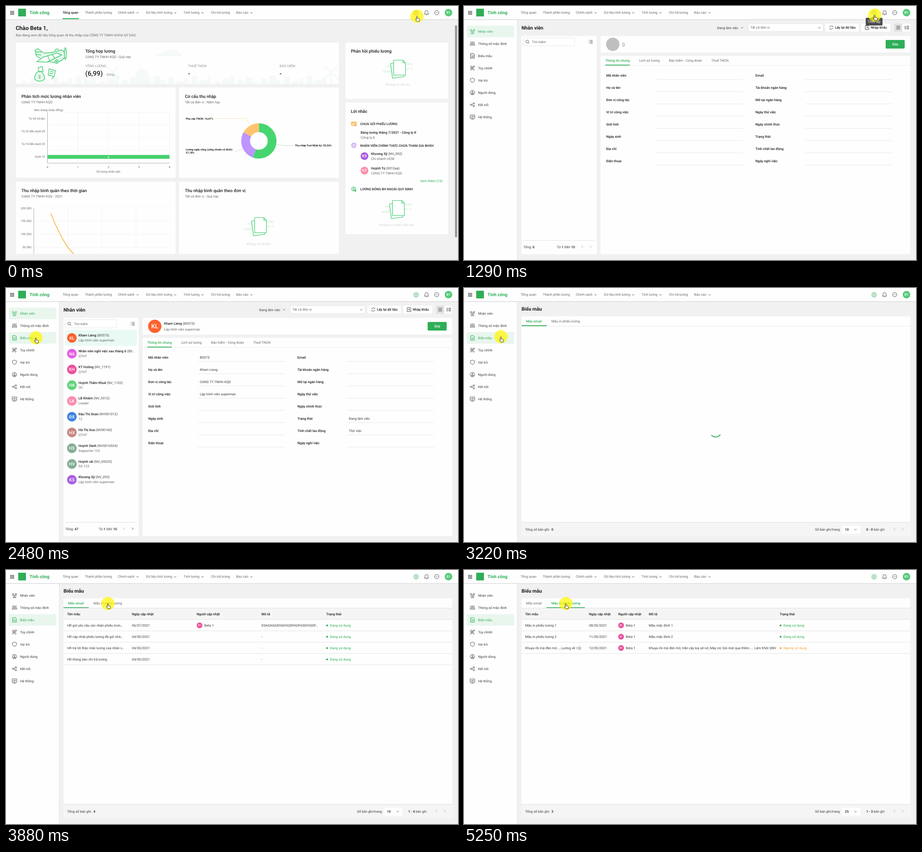
These frames come from a looping animation (998x561 px, 5550 ms). An HTML page:

```html
<!DOCTYPE html>
<html lang="vi">
<head>
<meta charset="utf-8">
<title>Tính công</title>
<style>
html,body{margin:0;width:100%;height:100%;overflow:hidden;background:#f1f1f2}
svg{display:block;width:100vw;height:100vh}
text{font:400 7.45px Roboto,sans-serif;fill:#3c3c3c;text-rendering:geometricPrecision}
.b{font-weight:500;font-size:7.45px;fill:#1f1f1f}
.r{font-weight:400;fill:#444}
.m{fill:#686868}
.l{fill:#929292}
.h{font-weight:500;font-size:9.5px;fill:#1f1f1f}
.t{font-weight:600;font-size:10.7px;fill:#1d1d1d}
.s{font-size:6.45px;fill:#666}
.x{font-weight:700;font-size:5.85px;fill:#222}
.pale{fill:#d4d4d4}
.g{fill:#2fae58}
.o{fill:#f3a13a}
.w{fill:#fff}
.i{font-style:italic}
.c{text-anchor:middle}
.e{text-anchor:end}
.tip{animation:tip 5550ms linear infinite}
.spin{transform-origin:555.5px 316px;animation:spin 1110ms linear -930ms infinite}
.cursor{animation:move 5550ms linear infinite}
@keyframes spin{to{transform:rotate(360deg)}}
@keyframes tip{0%,2.7%{opacity:0}8%,35.9%{opacity:1}41.2%,100%{opacity:0}}
</style>
</head>
<body>
<script>
const LOOP = 5550, GREEN = '#2fae58', MINT = '#3ecb70';
const rules = [];
const pc = ms => (ms / LOOP * 100).toFixed(4) + '%';

const T = (x, y, s, cls = '', extra = '') =>
  `<text x="${x}" y="${y}" dy=".355em" class="${cls}" ${extra}>${s}</text>`;
const R = s => `<tspan class="r">${s}</tspan>`;
const box = (x, y, x2, y2, fill = '#fefefe', extra = '') =>
  `<rect x="${x}" y="${y}" width="${x2 - x}" height="${y2 - y}" fill="${fill}" ${extra}/>`;
const card = (x, y, x2, y2) => box(x, y, x2, y2, '#fefefe', 'rx="2"');
const field = (x, y, x2, y2) => box(x, y, x2, y2, '#fff', 'rx="1.5" stroke="#dcdcdc" stroke-width=".7"');
const line = (d, stroke = '#444', w = .9, extra = '') =>
  `<path d="${d}" fill="none" stroke="${stroke}" stroke-width="${w}" ${extra}/>`;
const dot = (x, y, r, fill, extra = '') => `<circle cx="${x}" cy="${y}" r="${r}" fill="${fill}" ${extra}/>`;
const ring = (x, y, r, stroke = '#444', w = .9) => dot(x, y, r, 'none', `stroke="${stroke}" stroke-width="${w}"`);
const at = (x, y, s) => `<g transform="translate(${x} ${y})">${s}</g>`;
const avatar = (x, y, r, fill, s, size) =>
  dot(x, y, r, fill) + T(x, y, s, 'w c', `style="font-size:${size}px;font-weight:500"`);
const down = (x, y) => line(`M${x - 2.3} ${y - 1.1}l2.3 2.3 2.3-2.3`, '#555', 1);
const arrow = (x, y, dir, stroke) => line(`M${x - dir} ${y - 2.4}l${dir * 2.3} 2.4 ${-dir * 2.3} 2.4`, stroke);
const each = (list, fn) => list.map(fn).join('');

// Shows its content only between two moments of the loop.
function during(from, to, content) {
  const name = 'on' + rules.length;
  rules.push(`@keyframes ${name}{0%{visibility:hidden}${pc(from)}{visibility:visible}${pc(to)}{visibility:hidden}}`);
  return `<g style="animation:${name} ${LOOP}ms step-end infinite">${content}</g>`;
}

const sheets = (x, y) => at(x, y,
  box(-17, 11, -6, 16, '#eaf7ef', 'rx="2.5"') + box(-24, 22.5, -5, 27.5, '#eaf7ef', 'rx="2.5"') +
  box(27, 6.5, 42, 11.5, '#eaf7ef', 'rx="2.5"') + dot(39, 19, 2.5, '#eaf7ef') + box(24, 17, 34, 21.5, '#eaf7ef') +
  `<g fill="#f3fbf6" stroke="${MINT}" stroke-width="1.2"><path d="M0 6l-7 2 4.5 32 25.5-3.5v-4z"/>
   <path fill="#fff" d="M0 0h20.5l5.5 6v27h-26zM20.5 0v6h5.5"/></g>`);

const gear = stroke => at(905.5, 15,
  line('M-1.3-5h2.6l.5 1.6 1.7-.5 1.5 2.2-1.1 1.7 1.1 1.7-1.5 2.2-1.7-.5-.5 1.6h-2.6l-.5-1.6-1.7.5-1.5-2.2 1.1-1.7-1.1-1.7 1.5-2.2 1.7.5z', stroke, 1) +
  ring(0, 0, 1.7, stroke, 1));

function header() {
  const nav = [[174, 'Thành phần lương'], [247, 'Chính sách', 290.5], [309, 'Dữ liệu tính lương', 373.5],
    [392, 'Tính lương', 434], [452.5, 'Chi trả lương'], [508, 'Báo cáo', 542]];
  let s = box(0, 28.5, 998, 31, '#e2e3e4') + box(0, 0, 998, 29, '#fefefe');
  for (let k = 0; k < 9; k++) s += box(9.5 + k % 3 * 3.1, 11 + (k / 3 | 0) * 3.1, 11.6 + k % 3 * 3.1, 13.1 + (k / 3 | 0) * 3.1, '#333', 'rx=".4"');
  return s + box(27, 6, 44, 23, GREEN) +
    T(52, 14.7, 'Tính công', 'g', 'style="font-size:9.8px;font-weight:600"') +
    during(0, 1290, T(125, 14.7, 'Tổng quan', 'b') + box(125, 27, 161, 29, GREEN) + gear('#666')) +
    during(1290, LOOP, T(125, 14.7, 'Tổng quan', 'm') + gear(GREEN)) +
    each(nav, ([x, label, chev]) => T(x, 14.7, label, 'm') + (chev ? down(chev, 15) : '')) +
    line('M923.8 18h9.4l-1.3-2v-3q-.4-3-3.4-3.2q-3 .2-3.4 3.2v3zM927.3 19.7h2.4') +
    ring(951, 14.7, 4.7) + each([949, 951, 953], x => dot(x, 14.7, .6, '#444')) +
    avatar(977, 14.7, 8.3, '#53ca78', 'B1', 7.5);
}

function dashboard() {
  let city = '';
  for (let k = 0; k < 40; k++) {
    const h = 6 + k * 7 % 5 * 3;
    city += box(36 + k * 17, 172 - h, 36 + k * 17 + 8 + k % 3 * 4, 172, '#f5faf7');
  }
  city += '<path d="M283 172q2-33 17-34q16 2 20 34zM330 111q6-9 18-7q5-11 18-6q10-3 14 5q10-1 8 8z" fill="#f5faf7"/>' +
    each([235, 718], x => line(`M${x} 172v-25l-13-14m13 14l14-15m-14 15l16 14m-16-14l-15 14`, '#f3f9f5', 3));

  const art = `<g fill="#e4f8eb" stroke="${MINT}" stroke-width="1.4" stroke-linejoin="round">
    <path d="M67 110l-3-12 6-4 14 10q22-1 38-7q9 4 9 12q-3 11-18 15q-24 3-46-14z"/>
    <path fill="#fff" d="M82 113l30-9 11 4-32 16-23-1z"/><path d="M92 110l5 11m5-14l6 9"/>
    <path d="M64 101l15 1m-14 5l13 1m29-9q4-6 10-3"/>
    <ellipse cx="131" cy="105" rx="2.2" ry="13"/><circle cx="112" cy="123" r="4"/><circle cx="112" cy="123" r="1.2"/>
    <path fill="#fff" d="M71 136l9-2 2 10-9 1z"/>
    <path d="M70 145h8q8 7 7 15q-2 6-11 6t-11-6q0-8 7-15z"/>
    <path fill="#fff" d="M95 139l14 4-3 13-13-4zM97 144l8 2m-9 2l7 2m2 7l-4 4"/></g>` +
    T(74, 157, '$', 'g c', 'style="font-size:9px"');

  const bars = line('M91.5 235h270M91.5 263h270M91.5 291h270M91.5 319h270M159 235v112M226 235v112M293.5 235v112M361 235v112', '#f0f0f0', .7) +
    line('M91.5 235v112h269.5', '#999', .8) + box(91.5, 329, 361, 337.5, '#46d16e') + T(226, 333.5, '4', 'x w c') +
    T(62, 230, 'Mức lương (triệu đồng)', 's i') +
    each(['Từ 30 trở lên', 'Từ 20 đến dưới 30', 'Từ 10 đến dưới 20', 'Dưới 10'], (s, k) => T(86, 248.5 + 28.1 * k, s, 's e')) +
    each([0, 1, 2, 3, 4], k => T(91.5 + 67.4 * k, 355.5, k, 's c')) + T(226, 366, 'Số lượng nhân viên', 's i c');

  const slice = (start, share, stroke) =>
    `<circle cx="558.3" cy="298" r="29.25" fill="none" stroke="${stroke}" stroke-width="19.5" pathLength="100"
     stroke-dasharray="${share} 100" transform="rotate(${start - 90} 558.3 298)"/>`;
  const donut = slice(0, 55.56, '#46d66f') + slice(200, 27.78, '#be95ff') + slice(300, 16.67, '#fec46f') +
    line('M462 248.5h68l9 15', '#fbdba8', .8) + line('M504 321h4l14-5', '#d9c2fb', .8) + line('M597 306l20 2.5h17', '#a3e6b7', .8) +
    T(397, 248.5, 'Phụ cấp TNCN: 16,67%', 'x') + T(638, 308, 'Thu nhập Test Nhật ký: 55,56%', 'x') +
    T(397, 317.3, 'Lương ngày công (công chuẩn cố định):', 'x') + T(397, 323.6, '27,78%', 'x');

  const curve = line('M137 446v101M211.5 446v101M287 446v101M61.5 446h300M61.5 475h300M61.5 504h300M61.5 532.5h300', '#f0f0f0', .7) +
    line('M61.5 446v101.5', '#999', .8) + line('M99 458C110 486 129 529 149.5 547.5', '#f9a11b', 1.3) +
    each(['200.000', '150.000', '100.000', '50.000'], (s, k) => T(56, 446.5 + 28.7 * k, s, 's e'));

  const notes =
    each([[260, '#fff1dc', 'CHƯA GỬI PHIẾU LƯƠNG'], [308, '#f1e8fc', 'NHÂN VIÊN CHÍNH THỨC CHƯA THAM GIA BHXH'],
      [404.5, '#e2f7e9', 'LƯƠNG ĐÓNG BH NGOÀI QUY ĐỊNH']],
      ([y, fill, s]) => dot(768, y, 7, fill) + T(782, y, s, 'b', 'style="font-size:7.25px"')) +
    line('M763 256.5h10v7h-10zl5 4 5-4', '#f5a02c', 1.1) + dot(771.5, 263.5, 2, '#f5a02c') +
    line('M768 303l4 1.5v3.5q-.5 3.5-4 5q-3.5-1.5-4-5v-3.5zM768 305.5v3m0 1v1', '#9d62e0') +
    ring(767.5, 404, 4.2, GREEN) + T(767.5, 404, '$', 'g c') + dot(771.5, 408, 1.7, GREEN) +
    T(783, 279.5, 'Bảng lương tháng 7/2021 - Công ty K', 'b') + T(783, 290.5, 'Công ty K', 'm') +
    avatar(791.5, 331.5, 8.6, '#a95fe0', 'KS', 8.4) + T(806, 326.3, 'Khương Sỹ' + R(' (NV_092)'), 'b') + T(806, 337.3, 'Chi nhánh HCM', 'm') +
    avatar(791.5, 363.5, 8.6, '#fa8eac', 'HT', 8.4) + T(806, 358.3, 'Huỳnh Tú' + R(' (0013aa)'), 'b') + T(806, 369.3, 'CôNG TY TNHH KQD', 'm') +
    T(964, 386.5, 'Xem thêm (16)', 'g e');

  return T(21.5, 49, 'Chào Beta 1,', 't', 'style="font-size:12.4px"') +
    T(21.5, 64.5, 'Bạn đang xem dữ liệu tổng quan về thu nhập của CÔNG TY TNHH KHOA QY DAO.', 'm') +
    card(22, 81, 735, 172) + card(22, 180, 374.5, 379.5) + card(382, 180, 735, 379.5) + card(22, 388, 374.5, 547.5) +
    card(382, 388, 735, 547.5) + card(749.5, 81, 976, 205) + card(749.5, 213, 976, 504) +
    box(991.5, 42.5, 995.8, 511, '#929292', 'rx="2"') + city + art +
    T(175, 100, 'Tổng hợp lương', 'h') + T(175, 112.5, 'CôNG TY TNHH KQD - Quý này', 'm') +
    T(175, 132, 'TỔNG LƯƠNG', 'l') + T(402, 132, 'THUẾ TNCN', 'l') + T(604, 132, 'BẢO HIỂM', 'l') +
    T(175, 148.5, '(6,99)', '', 'style="font-size:14.7px;font-weight:500;fill:#222"') + T(222, 151, 'Đồng', 'l') +
    each([402, 604], x => T(x, 149, '-', 'b', 'style="font-size:14px"')) +
    each([[34, 199.5, 'Phân tích mức lương nhân viên', 'CôNG TY TNHH KQD'], [395, 199.5, 'Cơ cấu thu nhập', 'Tất cả đơn vị - Năm nay'],
      [34, 407.5, 'Thu nhập bình quân theo thời gian', 'CôNG TY TNHH KQD - 2021'],
      [395, 407.5, 'Thu nhập bình quân theo đơn vị', 'Tất cả đơn vị - Quý này']],
      ([x, y, a, b]) => T(x, y, a, 'h') + T(x, y + 12.5, b, 'm')) +
    T(761.5, 100, 'Phản hồi phiếu lương', 'h') + T(761.5, 232.5, 'Lời nhắc', 'h') +
    bars + donut + curve + notes +
    sheets(549, 467.5) + T(558, 525, 'Không có dữ liệu', 'pale i c') +
    sheets(856, 119.5) + T(865.5, 173.5, 'Không có dữ liệu', 'pale i c') +
    sheets(853.5, 429.5) + T(863, 483.5, 'Không có nhân viên nào', 'pale i c');
}

const icons = [
  c => ring(0, 0, 1.6, c) + ring(-3.3, -3, 1.5, c) + ring(3.3, -3, 1.5, c) + line('M-3 5v-1q3-3 6 0v1zM-5 1.5l2.5-1.5m7.5 1.5l-2.5-1.5', c),
  c => line('M-3.5-5v5m0 4v1M0-5v1m0 4v5M3.5-5v5m0 4v1', c) + ring(-3.5, 2, 1.6, c) + ring(0, -2, 1.6, c) + ring(3.5, 2, 1.6, c),
  c => line('M-4-5h6l2 2v8h-8zM-2-.5h4M-2 2.2h4', c, 1.1),
  c => line('M-4.5-3.5l2-1.5 6.5 8.5-1.5 1.5zM4.5-4l-8 8.5-1.5-1 8-8.5zM-5-1l2 1m6-5l2 3', c),
  c => line('M0-5l4.5 1.8v3.2q-.5 3.5-4.5 5q-4-1.5-4.5-5v-3.2z', c),
  c => ring(0, 0, 4.9, c) + ring(0, -1.6, 1.4, c) + line('M-2.5 3v-1.2q2.5-1.6 5 0v1.2z', c),
  c => ring(-3.2, 0, 1.6, c) + ring(3.2, -3, 1.6, c) + ring(3.2, 3, 1.6, c) + line('M-1.7-.7l3.4-1.6m-3.4 3l3.4 1.6', c),
  c => line('M-5-4.5h10v7.5h-10zM-2.5 5h5M-3.5-.7h2l1 1.7 1.3-3.5 1 1.8h1.7', c)
];
const menu = ['Nhân viên', 'Thông số mặc định', 'Biểu mẫu', 'Tùy chỉnh', 'Vai trò', 'Người dùng', 'Kết nối', 'Hệ thống'];
const entry = (k, on) => {
  const y = 56.2 + 27 * k;
  return (on ? box(6, y - 12.7, 111, y + 12.7, '#e9f6ee', 'rx="3"') : '') +
    at(18.7, y, icons[k](on ? GREEN : '#444')) + T(31, y, menu[k], on ? 'g' : '');
};
const sidebar = () => box(117, 30, 118.5, 561, '#e6e7e8') + box(0, 30, 117, 561) + each(menu, (_, k) => entry(k, false)) +
  during(1290, 3110, entry(0, true)) + during(2330, LOOP, entry(2, true));

function employees() {
  const people = [['KL', '#fd6230', 'Kham Lieng', 'B0575', 'Lập trình viên superman'],
    ['N6', '#e35ce2', 'Nhân viên nghỉ việc sau tháng 6', '', 'QTHT'], ['KH', '#ef4f9c', 'KT Hường', 'NV_1191', 'QTHT'],
    ['HK', '#60d17c', 'Huỳnh Thẩm Khuê', 'NV_1102', 'QC'], ['LK', '#fc8cad', 'LB Khiêm', 'NV_9312', 'Leader'],
    ['ĐX', '#3f85e2', 'Đậu Thị Xoan', 'NV001012', '12'], ['HX', '#c98681', 'Hà Thị Xoa', 'NV00160', 'QTHT'],
    ['HS', '#84ae96', 'Huỳnh Sành', 'NV0016534', 'Supporter 123'], ['HV', '#84ae96', 'Huỳnh vải', 'NV_09325', 'SA 123'],
    ['KS', '#a95fe0', 'Khương Sỹ', 'NV_092', 'Lập trình viên superman']];
  const left = ['Mã nhân viên', 'Họ và tên', 'Đơn vị công tác', 'Vị trí công việc', 'Giới tính', 'Ngày sinh', 'Địa chỉ', 'Điện thoại'];
  const right = ['Email', 'Tài khoản ngân hàng', 'Mở tại ngân hàng', 'Ngày thử việc', 'Ngày chính thức', 'Trạng thái', 'Tính chất lao động', 'Ngày nghỉ việc'];
  const rowY = k => 153 + 27 * k;
  const form = (x, x2, labels) => each(labels, (s, k) => T(x, rowY(k), s, 'b') + line(`M${x2} ${rowY(k) + 9.3}h192`, '#dedede', .7));
  const values = (x, first, list) => each(list, (s, k) => T(x, rowY(first + k), s));

  const list = box(131, 92.5, 289, 127.5, '#e9faf4', 'rx="1.5"') + each(people, ([abbr, fill, name, code, role], k) => {
    const y = 110 + 34.8 * k;
    return avatar(145.5, y + .3, 10.6, fill, abbr, 9.6) + T(160, y - 5.5, name + R(code ? ` (${code})` : ' (B0…'), 'b') + T(160, y + 5.3, role, 'm');
  });
  const total = n => T(131, 532, 'Tổng: <tspan class="b">' + n + '</tspan>');

  return T(127, 48, 'Nhân viên', 't') + T(559, 48, 'Đang làm việc') + down(614, 48) +
    field(627.5, 39, 793, 56.5) + T(632.5, 47.5, 'Tất cả đơn vị', 'm') + down(784.5, 48) +
    card(798, 39, 872, 56.5) + T(819, 47.7, 'Lấy lại dữ liệu', 'b') + line('M807.5 47q.5-3 3.5-3.3q2 0 3.3 2v-2m.2 4.3q-.5 3-3.5 3.3q-2 0-3.3-2v2') +
    card(877, 39, 941, 56.5) + T(898, 47.7, 'Nhập khẩu', 'b') + line('M890 43.5h-4v8.5h8v-3.5M894 47.7h-5m2-2l-2 2 2 2m-1-6h4v2', '#333') +
    box(950, 39, 967.5, 56.5, '#dfe0e1') + card(967.5, 39, 985.5, 56.5) +
    line('M954.5 44.7h8.5m-8.5 3h8.5m-8.5 3h8.5M972.5 45h4m-4 2.7h4m-4 2.7h4m2-6h3v6.5h-3z', '#333') +
    card(127, 66, 293, 548) + field(131, 70, 244, 88) + ring(139.5, 78.5, 3.1) + line('M141.8 80.8l2.2 2.2') + T(150, 79, 'Tìm kiếm', 'm') +
    line('M278 76h6m-6 3h6m-6 3h6M275.5 76h1m-1 3h1m-1 3h1', '#333') + line('M131 517.5h157.5', '#d8d8d8', .8) +
    T(205, 532, 'Từ <tspan class="b">1</tspan> Đến <tspan class="b">10</tspan>') + arrow(261.5, 531.5, -1, '#999') +
    card(301.5, 66, 985.5, 103) + card(301.5, 110, 985.5, 548) +
    box(931, 75, 973, 94, GREEN, 'rx="2"') + T(952, 84.3, 'Sửa', 'b w c') +
    line('M301.5 131.3h684', '#e8e8e8', .7) + box(312, 129.6, 366, 131.4, GREEN) + T(312, 120, 'Thông tin chung', 'b g') +
    T(387, 120, 'Lịch sử lương', 'm') + T(452.5, 120, 'Bảo hiểm - Công đoàn', 'm') + T(546, 120, 'Thuế TNCN', 'm') +
    form(314, 424, left) + form(643.5, 753, right) +
    during(1290, 1370, total(0) + arrow(279.5, 531.5, 1, '#999')) +
    during(1370, 3110, total(47) + list + arrow(279.5, 531.5, 1, '#333')) +
    during(1290, 1480, dot(328.5, 84.6, 14.7, '#bfbfbf') + T(349, 84.6, '()', 'm', 'style="font-size:9px"')) +
    during(1480, 3110, avatar(328.5, 84.6, 14.7, '#fd6230', 'KL', 13.4) + T(349, 78, 'Kham Lieng' + R(' (B0575)'), 'b') +
      T(349, 91, 'Lập trình viên superman', 'm') +
      values(428, 0, ['B0575', 'Kham Lieng', 'CôNG TY TNHH KQD', 'Lập trình viên superman']) + values(757, 5, ['Đang làm việc', 'Thử việc']));
}

function templates() {
  const heads = ['Tên mẫu', 'Ngày cập nhật', 'Người cập nhật', 'Mô tả', 'Trạng thái'];
  const mailCols = [135, 278, 421, 564, 707], printCols = [135, 276, 340.5, 408, 697];
  const mails = [['HR gửi yêu cầu xác nhận phiếu lươn…', '06/07/2021', 1, 'DSADASASFADFASDFADFASDFASDF…', 1],
    ['HR cập nhật phiếu lương đã gửi nhâ…', '04/05/2021', 0, '-', 1],
    ['HR trả lời thắc mắc lương của nhân v…', '04/05/2021', 0, '-', 1], ['HR thông báo chi trả lương', '04/05/2021', 0, '-', 1]];
  const prints = [['Mẫu in phiếu lương 1', '08/05/2021', 1, 'Mẫu mặc định 1', 1], ['Mẫu in phiếu lương 2', '11/05/2021', 1, 'Mẫu mặc định 2', 1],
    ['Khuya rồi mà đèn mờ.....Lương về =)))', '12/05/2021', 1,
      'Khuya rồi mà đèn mờ, Hẳn cây kia sẽ nở, Mây rơi, Gió mát qua thềm..... Lâm Khởi QNV', 0]];

  const head = cols => box(127, 84, 985.5, 109.5, '#f5f5f6') + line('M127 84.3h858.5M127 109.5h858.5', '#dedede', .8) +
    each(heads, (s, k) => T(cols[k], 97, s, 'b'));
  const rows = (cols, data) => each(data, ([name, date, user, note, active], k) => {
    const y = 122.2 + 25 * k, [a, b, c, d, e] = cols;
    return T(a, y, name) + T(b, y, date) + (user ? avatar(c + 6.3, y, 6.3, '#ea4f9b', 'B1', 5.6) + T(c + 16.8, y, 'Beta 1') : '') +
      T(d, y, note) + dot(e + 2, y + .3, 2.1, active ? GREEN : '#f3a13a') +
      T(e + 8.4, y, active ? 'Đang sử dụng' : 'Ngừng sử dụng', active ? 'g' : 'o') + line(`M127 ${y + 12.3}h858.5`, '#dedede', .8);
  });
  const footer = (n, size) => T(193, 533, n, 'b') + T(841, 533.5, size, 'b') +
    T(888, 533, `${n ? 1 : 0} - ${n}` + R(' bản ghi'), 'b');
  const empty = sheets(547, 277) + T(556, 334.5, 'Không có dữ liệu', 'l i c');
  const spinner = `<g class="spin">${line('M547.2 306a13 13 0 0 0 0 20', GREEN, 2)}</g>`;

  return T(127, 46.5, 'Biểu mẫu', 't') + card(127, 62.5, 985.5, 548) + line('M127 84.3h858.5', '#e5e5e5', .8) +
    box(127, 517.5, 985.5, 548, '#f5f5f6') + line('M127 517.5h858.5', '#dadada', .8) +
    T(135, 533, 'Tổng số bản ghi:') + T(775, 533.5, 'Số bản ghi/trang') + card(835, 524.5, 875, 542.5) + down(864.5, 533.5) +
    arrow(950.5, 532.5, -1, '#999') + arrow(968.5, 532.5, 1, '#999') +
    during(3110, 4620, T(137, 73, 'Mẫu email', 'b g') + T(193, 73, 'Mẫu in phiếu lương', 'm') + box(127, 82.3, 182.5, 84.2, GREEN)) +
    during(4620, LOOP, T(137, 73, 'Mẫu email', 'm') + T(193, 73, 'Mẫu in phiếu lương', 'b g') + box(182, 82.3, 267, 84.2, GREEN)) +
    during(3110, 3390, spinner) + during(3110, 3510, footer(0, 10)) +
    during(3390, 4620, head(mailCols)) + during(3390, 3590, empty) +
    during(3510, 4620, rows(mailCols, mails) + footer(4, 10)) +
    during(4620, 5110, spinner) + during(4620, 5180, footer(0, 25)) +
    during(5110, LOOP, head(printCols)) + during(5110, 5250, empty) +
    during(5180, LOOP, rows(printCols, prints) + footer(3, 25));
}

const tooltip = '<g class="tip"><path d="M905.5 20.5l6 6h-12z" fill="#4c4c4c"/>' +
  box(887, 26, 924, 43, '#4c4c4c', 'rx="1.5"') + T(905.5, 34.5, 'Thiết lập', 'w c') + '</g>';
const cursor = `<g class="cursor">${dot(0, 0, 14.5, '#fff500', 'opacity=".72"')}
  <path d="M-1.2 1.2a1 1 0 0 1 2 0v3.6l3.6.8q1.4.4 1.3 1.8l-.6 4.3h-5.2l-2.9-4.2q-.3-1.2.8-1l1 .9z" fill="#fff" stroke="#222" stroke-width=".9" stroke-linejoin="round"/></g>`;

const easeIn = 'cubic-bezier(.33,0,.67,.33)', easeOut = 'cubic-bezier(.33,.67,.67,1)';
const stops = [[0, 907.5, 22.5], [30, 907.5, 22.5], [510, 907, 20], [1770, 907, 20, easeIn], [2030, 663.5, 50], [2290, 112, 108, easeOut],
  [2480, 66, 110], [3110, 66, 110, 'cubic-bezier(.4,.2,.7,.7)'], [3550, 156, 96], [3660, 181, 90, easeOut], [3880, 225, 74], [LOOP, 225, 74]];
rules.push(`@keyframes move{${each(stops, ([ms, x, y, ease = 'linear']) =>
  `${pc(ms)}{transform:translate(${x}px,${y}px);animation-timing-function:${ease}}`)}}`);

const stage = during(0, 1290, dashboard()) + during(1290, LOOP, sidebar()) + during(1290, 3110, employees()) +
  during(3110, LOOP, templates()) + header() + tooltip + cursor;
document.head.insertAdjacentHTML('beforeend', `<style>${rules.join('')}</style>`);
document.body.insertAdjacentHTML('beforeend', `<svg viewBox="0 0 998 561">${stage}</svg>`);
</script>
</body>
</html>
```
